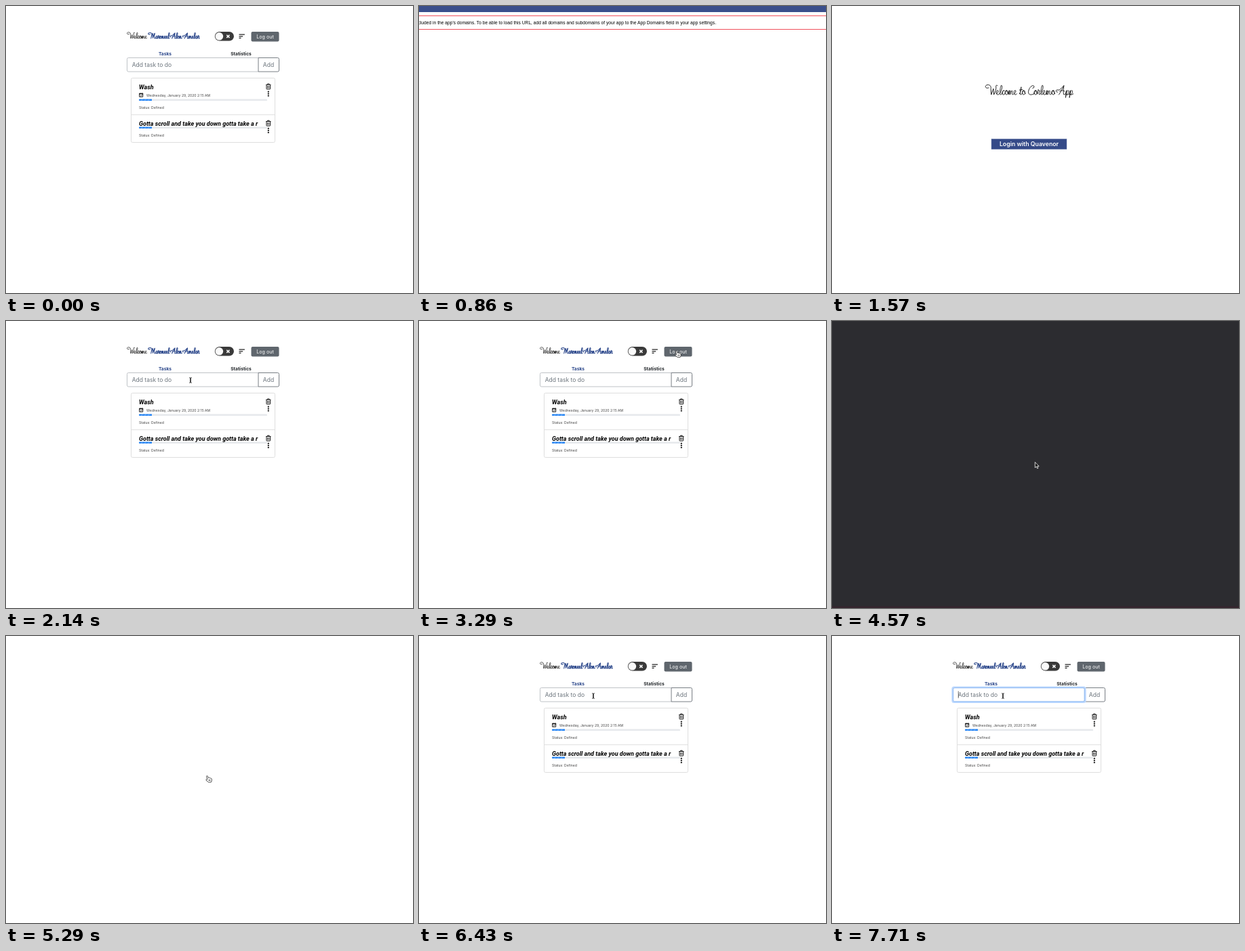
These frames come from a looping animation (600x424 px, 8 s). An HTML page:

```html
<!DOCTYPE html>
<html lang="en">
<head>
<meta charset="utf-8">
<title>Task list</title>
<style>
  html, body { margin: 0; width: 100%; height: 100%; overflow: hidden; background: #fff; }
  svg { display: block; width: 100vw; height: 100vh; }
  text { font-family: Inter, "Open Sans", sans-serif; }
  .task { font: italic 700 9px Roboto, sans-serif; }
  .small { font-size: 5.1px; fill: #444; }
  .script { fill: none; stroke: #1a1a1a; stroke-linecap: round; stroke-linejoin: round; }
</style>
</head>
<body>
<svg viewBox="0 0 600 424" xmlns="http://www.w3.org/2000/svg">
  <defs>
    <g id="actions" fill="none" stroke="#1c1c1c">
      <path d="M-3.7 2H3.7M-1.3 1.8V.7H1.3V1.8M-2.8 2.3V8.1Q-2.8 8.6-2.3 8.6H2.3Q2.8 8.6 2.8 8.1V2.3" stroke-width="1"/>
      <path d="M-1.2 3.6V7.2M0 3.6V7.2M1.2 3.6V7.2" stroke-width=".7"/>
      <path d="M0 12.4v.01M0 15.4v.01M0 18.4v.01" stroke-width="2.3" stroke-linecap="round"/>
    </g>
    <g id="progress">
      <rect width="189" height="2.5" rx="1.2" fill="#e6e9ec"/>
      <path d="M1.2 0H19V2.5H1.2A1.25 1.25 0 0 1 1.2 0Z" fill="#2484f5"/>
      <path d="M3 2.5L5.5 0M8 2.5L10.5 0M13 2.5L15.5 0" stroke="#fff" stroke-opacity=".2" stroke-width="1.6"/>
    </g>
    <clipPath id="titleClip"><rect x="190" y="165" width="185" height="14"/></clipPath>
  </defs>
  <rect width="600" height="424" fill="#fff"/>

  <g id="app">
    <path class="script" data-word="Welcome" transform="translate(181.5 48) scale(.4)" stroke-width="1.8"/>
    <path class="script" data-word="Maroneel Alon Amelar" transform="translate(212.5 48) scale(.385)" style="stroke:#2b478b" stroke-width="2.7"/>
    <rect x="307.8" y="38" width="28.2" height="13.6" rx="6.8" fill="#3a3a3a"/>
    <circle cx="314.4" cy="44.8" r="5.8" fill="#fafafa"/>
    <path d="M325.3 42.7l4.2 4.2m0-4.2l-4.2 4.2" stroke="#fff" stroke-width="1.6"/>
    <path d="M343.5 42.2h8.4M343.5 44.8h5.7M343.5 47.4h3" stroke="#222" stroke-width="1.3"/>
    <rect x="361.5" y="38" width="41" height="14.5" rx="2" fill="#5f666d"/>
    <text x="382" y="47.6" font-size="7.2" fill="#fff" text-anchor="middle">Log out</text>
    <g font-size="6.7" font-weight="700" text-anchor="middle">
      <text x="234.5" y="72.8" fill="#2b478b">Tasks</text>
      <text x="346.5" y="72.8" fill="#212529">Statistics</text>
    </g>
    <path d="M372 76.5H180.5Q178.5 76.5 178.5 78.5V95Q178.5 97 180.5 97H372" fill="#fff" stroke="#bfc3c7"/>
    <path d="M372 76.5H400.5Q402.5 76.5 402.5 78.5V95Q402.5 97 400.5 97H372Z" fill="#fff" stroke="#787e84"/>
    <g id="focus">
      <rect x="177.5" y="75.5" width="196" height="22.5" rx="2.5" fill="none" stroke="#bcd8ff" stroke-width="2.2"/>
      <rect x="178.7" y="76.7" width="193.4" height="20.1" rx="2" fill="#fff" stroke="#80b4f7" stroke-width=".9"/>
    </g>
    <g font-size="8.5" fill="#6c757d">
      <text x="185.7" y="90">Add task to do</text>
      <text x="387" y="90" text-anchor="middle">Add</text>
    </g>
    <path id="caret" d="M186.3 81.5V91.8" stroke="#444" stroke-width=".8"/>

    <rect x="184.5" y="106.5" width="212" height="95" rx="2" fill="#fff" stroke="#dedede"/>
    <path d="M184.5 160.7H396.5" stroke="#dedede"/>
    <text class="task" x="196" y="123">Wash</text>
    <path d="M196.7 129.6h5v4.6h-5zM197.9 129v-1M200.6 129v-1" fill="none" stroke="#1c1c1c"/>
    <path d="M196.2 129.7h6" stroke="#1c1c1c" stroke-width="1.4"/>
    <path d="M197.9 132.2l1 .9 1.7-1.8" fill="none" stroke="#1c1c1c" stroke-width=".8"/>
    <text class="small" x="207" y="134.2">Wednesday, January 29, 2020 2:15 AM</text>
    <use href="#progress" x="196" y="137.6"/>
    <text class="small" x="196" y="152.2">Status: Defined</text>
    <use href="#actions" x="386.8" y="114.3"/>
    <use href="#progress" x="196" y="178.6"/>
    <text class="task" x="196" y="177.2" clip-path="url(#titleClip)">Gotta scroll and take you down gotta take a r</text>
    <text class="small" x="196" y="193.2">Status: Defined</text>
    <use href="#actions" x="386.8" y="168.5"/>
  </g>

  <g id="error">
    <rect width="600" height="9" fill="#3a4f8c"/>
    <path d="M0 14.5H600M0 34.5H600" stroke="#f0505c"/>
    <text x="438" y="26.8" text-anchor="end" font-size="6.7" style="font-family:'Liberation Sans',Arial,sans-serif">included in the app's domains. To be able to load this URL, add all domains and subdomains of your app to the App Domains field in your app settings.</text>
  </g>

  <g id="login">
    <path class="script" data-word="Welcome to Corlemo App" transform="translate(231 131) scale(.63)" stroke-width="1.5"/>
    <rect x="235" y="196.3" width="111" height="15.4" fill="#354a88" stroke="#7d8ab3" stroke-width=".5"/>
    <text x="290.5" y="207" font-size="8.75" font-weight="600" fill="#fff" text-anchor="middle">Login with Quavenor</text>
  </g>

  <g id="dark">
    <rect width="600" height="424" fill="#2c2c30"/>
    <rect y="421.5" width="600" height="2.5" fill="#35242d"/>
  </g>

  <path id="cursor" stroke-linejoin="round"/>
</svg>
<script>
const $ = id => document.getElementById(id);

// Pen strokes: [advance, relative path]; each starts and ends 2 units above the baseline.
const GLYPHS = {
  e: [7, 'c4-1 6-8 3-8c-4 0-4 10 0 10c2 0 3-1 4-2'],
  l: [6, 'c5-5 8-18 5-20c-3-1-5 22-2 22c1 0 2-1 3-2'],
  c: [7, 'c0-5 4-10 6-7c-4-4-7 9-3 9c2 0 3-1 4-2'],
  o: [8, 'c0-5 3-8 4-8c-5 0-4 10 0 10c4 0 4-10 0-10c0 4 3 4 4 8'],
  a: [9, 'c0-5 4-9 6-7c-5-4-7 9-3 9c2 0 3-4 4-9c-1 5-1 9 0 9c1 0 1.5-1 2-2'],
  m: [13, 'c1-4 2-7 2-8l-1 10c1-6 3-11 4-9c1 1-1 6-1 9c1-6 4-11 5-9c1 1-2 9 1 9c1 0 2-1 3-2'],
  n: [9, 'c1-4 2-7 2-8l-1 10c1-6 3-11 4-9c1 1-2 9 1 9c1 0 2-1 3-2'],
  r: [7, 'c1-4 2-8 2-10c0 3 3 2 4 3c-2 3-3 9-1 9c1 0 1-1 2-2'],
  t: [6, 'c3-4 4-12 4-16c-1 6-4 18-1 18c1 0 2-1 3-2m-6-9l7-1'],
  p: [9, 'c1-4 2-7 2-8l-2 17c1-8 3-18 6-17c3 2-1 12-5 9c3 2 6 1 8-1'],
  W: [18, 'm0-14c-9 3-10-6-3-7c7-1 9 5 8 9l1 14l5-14l1 14c4-6 6-14 5-20c-1-2 3-3 4-1'],
  M: [21, 'm0-14c-8 3-10-5-2-6c6-1 9 2 8 8l-3 14c2-8 5-18 7-20l0 18c3-8 5-16 8-18c-2 8-3 20 0 20c1 0 2-1 3-2'],
  A: [19, 'm0-4c-5 0-5-6 1-5c6 1 10-8 14-10c-3 6-9 18-12 21m12-21c-1 8-2 18 0 21c1 0 3-1 4-2m-14-6c4-3 8-2 12 0'],
  C: [14, 'm11-13c5-1 4-8-1-6c-9 4-13 21-4 21c4 0 6-1 8-2'],
  ' ': [6, '']
};

function scriptPath(word) {
  let x = 0, d = '';
  for (const letter of word) {
    const [advance, stroke] = GLYPHS[letter];
    d += `M${x}-2${stroke}`;
    x += advance;
  }
  return d;
}
document.querySelectorAll('[data-word]').forEach(p => p.setAttribute('d', scriptPath(p.dataset.word)));

const CURSORS = {
  arrow: ['M0 0V8.2L1.9 6.5L3.3 9.4L4.6 8.8L3.3 6H5.8Z', '#111', '#fff', .8],
  hand: ['M-.4 5.6L-1.7 1.2C-2 .1-.4-.3 0 .7L1.2 3.4C2 2.7 2.8 3 3 3.6C3.7 3 4.5 3.4 4.7 4C5.6 3.8 6 4.4 6 5.2V7.4L5 9.6H1.2L-2.2 6.8C-3 6-1.8 5-.4 5.6ZM1.9 5.6V7.6M3.5 5.6V7.6', '#fff', '#222', .8],
  beam: ['M-1.7-3.8q1.7 0 1.7 1V2.8q0 1-1.7 1M1.7-3.8q-1.7 0-1.7 1V2.8q0 1 1.7 1', 'none', '#111', 1]
};

// The screen refreshes in ticks of 1/7 second.
const TICK = 1000 / 7, LOOP = 8000;
const SCENES = [[0, 'app'], [6, 'error'], [11, 'login'], [12, 'app'], [24, 'login'],
  [32, 'dark'], [37, 'blank'], [38, 'login'], [39, 'app']];
const MOVES = [
  [13, 'arrow', 250, 66], [15, 'beam', 272, 87.5], [17, 'arrow', 297, 103], [18, 'arrow', 303, 116],
  [21, 'arrow', 380, 55], [22, 'arrow', 380, 55], [23, 'hand', 380, 44], [24, 'arrow', 380, 44],
  [25, 'arrow', 377, 50], [26, 'arrow', 377, 50], [30, 'hand', 303, 205], [31, 'hand', 299, 209.3],
  [32, 'arrow', 299.3, 208.5], [36, 'arrow', 299.3, 208.5], [37, 'hand', 297.3, 206.4],
  [38, 'hand', 299, 190], [39, 'arrow', 303, 156], [41, 'arrow', 303, 156],
  [44, 'beam', 264, 93], [46, 'beam', 250, 84], [49, 'beam', 252, 88.5]
];
const lastAt = (list, tick) => list.findLastIndex(item => item[0] <= tick);
const show = (id, on) => $(id).style.display = on ? '' : 'none';

function drawCursor(tick) {
  const i = lastAt(MOVES, tick);
  show('cursor', i >= 0);
  if (i < 0) return;
  const [start, shape, x, y] = MOVES[i];
  const [end, , nextX, nextY] = MOVES[i + 1] || [start + 1, shape, x, y];
  const k = (tick - start) / (end - start);
  const [d, fill, stroke, width] = CURSORS[shape];
  const attrs = { d, fill, stroke, 'stroke-width': width,
    transform: `translate(${x + (nextX - x) * k} ${y + (nextY - y) * k})` };
  for (const name in attrs) $('cursor').setAttribute(name, attrs[name]);
}

function render(ms) {
  const tick = Math.floor((ms % LOOP + 5) / TICK) % 56;
  const scene = SCENES[lastAt(SCENES, tick)][1];
  for (const id of ['app', 'error', 'login', 'dark']) show(id, id === scene);
  show('focus', tick >= 46);
  show('caret', tick >= 46 && (tick < 50 || tick >= 54));
  drawCursor(tick);
}

let origin;
function loop(now) {
  origin ??= now;
  render(now - origin);
  requestAnimationFrame(loop);
}
render(0);
requestAnimationFrame(loop);
</script>
</body>
</html>
```
